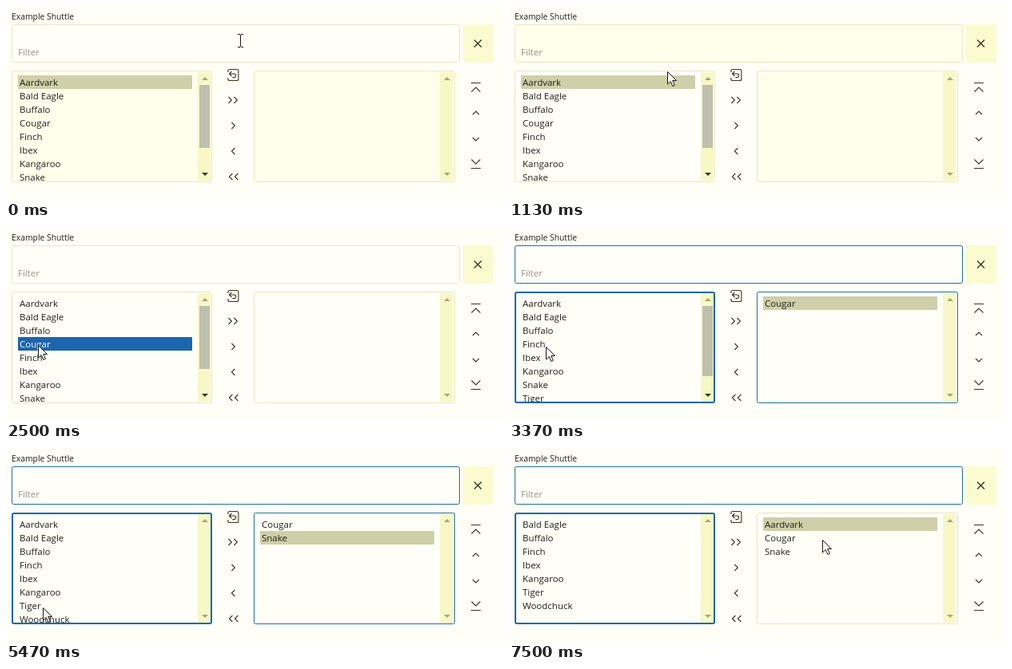
An HTML page for the animation above (8 s loop, 622 by 242 pixels).

```html
<!DOCTYPE html>
<html lang="en">
<head>
<meta charset="utf-8">
<title>Example Shuttle</title>
<style>
  html, body { margin: 0; width: 100%; height: 100%; overflow: hidden; background: #fffff8; }
  svg { display: block; font: 11.5px "Open Sans", "Noto Sans", sans-serif; fill: #20201a; }
  .icon { fill: none; stroke: #35351f; stroke-width: 1.1; }
</style>
</head>
<body>
<svg id="stage" width="622" height="242" viewBox="0 0 622 242">
  <defs>
    <clipPath id="rows"><rect x="9" y="83" width="551" height="136"/></clipPath>
  </defs>
  <g id="boxes"></g>
  <text x="7" y="17" font-size="10.35">Example Shuttle</text>
  <text x="15" y="62" fill="#949482">Filter</text>
  <rect x="572" y="23" width="38" height="48" rx="2" fill="#fbfbcf"/>
  <g class="icon">
    <path d="M586 42.5l9 9m0-9l-9 9" stroke-width="1.4"/>
    <g transform="translate(-.6 0)">
      <path d="M278.5 83v-1.5a2 2 0 0 1 2-2h9a2 2 0 0 1 2 2v10a2 2 0 0 1-2 2h-9a2 2 0 0 1-2-2v-1.5M283 82l-3 3 3 3M280 85h6a2.3 2.3 0 0 1 0 4.6h-2"/>
      <path d="M279 114l4 4-4 4m7-8l4 4-4 4M283 146l4 4-4 4M287 178l-4 4 4 4M284 210l-4 4 4 4m7-8l-4 4 4 4"/>
    </g>
    <path d="M582 96.5h12M582.5 107.5l5.5-5.5 5.5 5.5M584 136l4-4 4 4M584 165l4 4 4-4M582.5 192.5l5.5 5.5 5.5-5.5M582 203.5h12"/>
  </g>
  <g id="lists"></g>
  <path id="beam" d="M-3 -7.5h3m1 0h3M.5 -7v15M-3 8.5h3m1 0h3" fill="none" stroke="#15150f"/>
  <path id="arrow" d="M.5 .5v15.5l3.7-3.5 2.7 6 2.5-1.1-2.7-5.9h4.8z" fill="#fff" stroke="#15150f"/>
</svg>
<script>
const LOOP = 8000;
const SELECTED = "#1d65ad", INACTIVE = "#cfcfa9";
const animals = ["Aardvark", "Bald Eagle", "Buffalo", "Cougar", "Finch",
  "Ibex", "Kangaroo", "Snake", "Tiger", "Woodchuck"];
const moves = [
  { name: "Cougar", select: 2500, move: 3000 },
  { name: "Snake", select: 4370, move: 4900 },
  { name: "Aardvark", select: 6400, move: 6800 },
];
// time, x, y of the pointer
const pointer = [
  [0, 293, 43], [30, 293, 43], [400, 292, 43], [800, 292, 43], [1600, 40, 148],
  [3230, 40, 148], [3370, 46, 150], [3730, 46, 200], [5470, 46, 200],
  [5700, 38, 95], [7170, 38, 95], [7500, 392, 115], [LOOP, 392, 115],
];
const el = id => document.getElementById(id);
const clamp = v => Math.max(0, Math.min(1, v));

function pointerAt(t) {
  const i = pointer.findIndex(p => p[0] > t);
  const [t0, x0, y0] = pointer[i - 1], [t1, x1, y1] = pointer[i];
  const u = (t - t0) / (t1 - t0), e = u * u * (3 - 2 * u);
  return [x0 + (x1 - x0) * e, y0 + (y1 - y0) * e].map(Math.round);
}

const rect = (x, y, w, h, fill) =>
  `<rect x="${x}" y="${y}" width="${w}" height="${h}" fill="${fill}"/>`;

function box(x, y, w, h, bright, focus, color = "#207398", line = 1) {
  const frame = (width, style) => {
    const d = width / 2;
    return `<rect x="${x + d}" y="${y + d}" width="${w - width}" height="${h - width}" rx="2" ${style}/>`;
  };
  return frame(1, `fill="${bright ? "#fffff8" : "#ffffec"}" stroke="#e8e8c2"`) +
    frame(line, `fill="none" stroke="${color}" stroke-width="${line}" opacity="${focus}"`);
}

function list(x, names, selected, selectedFill) {
  const overflow = names.length * 17 > 136;
  const triangle = (y, dir, fill) =>
    `<path d="M${x + 238} ${y}h8l-4 ${4 * dir}z" fill="${fill}"/>`;
  const rows = names.map((name, i) => {
    const on = name === selected, y = 87 + 17 * i;
    const color = on && selectedFill === SELECTED ? "#fff" : "#20201a";
    return (on ? rect(x + 8, y, 218, 17, selectedFill) : "") +
      `<text x="${x + 10}" y="${y + 13}" fill="${color}">${name}</text>`;
  }).join("");
  return `<g clip-path="url(#rows)">${rows}</g>` +
    rect(x + 233, 83, 16, 136, "#f8f8c6") +
    (overflow ? rect(x + 235, 99, 13, Math.round(792 / names.length), "#bfbfad") : "") +
    triangle(93, -1, "#a6a67e") +
    triangle(209, 1, overflow ? "#35352c" : "#a6a67e");
}

function draw(t) {
  const focus = clamp((t - 2500) / 130);
  const [x, y] = pointerAt(t);
  const inField = y < 71;
  const overLeft = !inField && x < 258;
  const overRight = !inField && x > 310 && x < 562;
  el("boxes").innerHTML =
    box(7, 23, 561, 48, focus || inField, focus) +
    box(7, 81, 251, 140, focus || overLeft, focus, "#0d68ad", 2) +
    box(310, 81, 252, 140, focus || overRight, overRight ? 0 : focus);

  const moved = moves.filter(m => t >= m.move).map(m => m.name);
  const active = moves.find(m => t >= m.select && t < m.move);
  const left = animals.filter(a => !moved.includes(a));
  const right = animals.filter(a => moved.includes(a));
  el("lists").innerHTML =
    (t < 2500 ? list(7, left, "Aardvark", INACTIVE)
              : list(7, left, active && active.name, SELECTED)) +
    list(310, right, moved[moved.length - 1], INACTIVE);

  for (const [id, shown] of [["beam", inField], ["arrow", !inField]]) {
    el(id).setAttribute("transform", `translate(${x} ${y})`);
    el(id).setAttribute("visibility", shown ? "visible" : "hidden");
  }
}

function tick() {
  draw(performance.now() % LOOP);
  requestAnimationFrame(tick);
}
tick();
</script>
</body>
</html>
```
